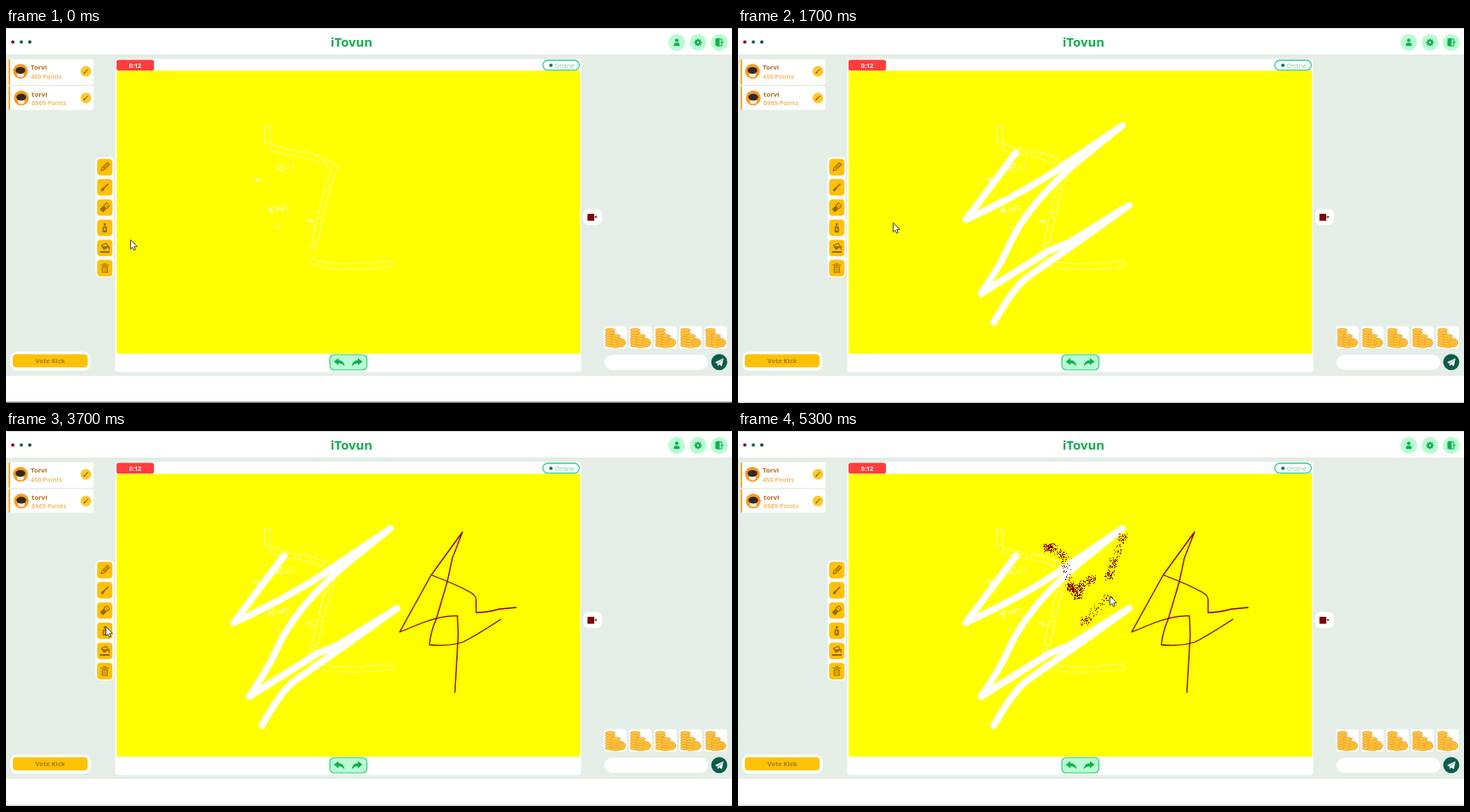
Write an HTML page with a canvas that moves like this. It is 854 by 442 pixels and loops after 5400 ms.

```html
<!DOCTYPE html>
<html lang="en">
<head>
<meta charset="utf-8">
<title>Drawing room</title>
<style>
html, body { margin: 0; width: 100%; height: 100%; overflow: hidden; background: #fff; }
canvas { display: block; width: 854px; height: 442px; }
svg { position: absolute; }
</style>
</head>
<body>
<canvas id="stage" width="854" height="442"></canvas>
<svg width="0" height="0"><path id="probe"/></svg>
<script>
const ctx = document.getElementById('stage').getContext('2d');
const probe = document.getElementById('probe');
const LOOP = 5400, STEP = 100;
const FONT = '"Open Sans", "Noto Sans", sans-serif';
const YELLOW = '#ffff00', MAROON = '#800000', BROWN = '#966a0e', GREEN = '#10b04f';
const AMBER = '#ffc107', GHOST = '#ffffa6';

const clamp = v => Math.max(0, Math.min(1, v));
const ease = k => k * k * (3 - 2 * k);
const mix = (a, b, k) => a.map((v, i) => v + (b[i] - v) * k);
function seeded(s) {
  return () => (s = (s * 16807) % 2147483647) / 2147483647;
}

// Gestures: each has a time span and a position within it
function rest(from, to, x, y) {
  return { from, to, pos: () => [x, y], draw() {} };
}
function stroke(from, to, d, color, width, lag) {
  const path = probe.cloneNode();
  path.setAttribute('d', d);
  const length = path.getTotalLength(), shape = new Path2D(d);
  const done = t => clamp((t - from) / (to - from));
  return {
    from, to,
    pos(t) {
      const p = path.getPointAtLength(length * done(t));
      return [p.x, p.y];
    },
    draw(t) {
      const k = done(t - lag);
      if (k > 0) inkPath(shape, color, width, 'round', [length * k, length * 2]);
    }
  };
}
// The can slows down at one key point per step, so dots pile up there
function spray(from, keys) {
  const to = from + (keys.length - 1) * STEP;
  function pos(t) {
    const s = clamp((t - from) / (to - from)) * (keys.length - 1);
    const i = Math.min(Math.floor(s), keys.length - 2);
    return mix(keys[i], keys[i + 1], ease(s - i));
  }
  function draw(t) {
    const rnd = seeded(from);
    ctx.fillStyle = MAROON;
    for (let time = from - 30; time < Math.min(t, to + 30); time += 1.5) {
      const [x, y] = pos(time);
      ctx.fillRect(Math.round(x - 5 + rnd() * 9), Math.round(y - 5 + rnd() * 9), 1, 1);
    }
  }
  return { from, to, pos, draw };
}

const zigzag = 'M327 147L268 226Q345 190 390 157L452 115L400 157Q340 208 318 258Q310 277 286 313' +
  'L365 263L391 252L460 209L400 252L340 294Q324 306 301 347';
const hook = 'M501 170Q530 181 546 190Q553 194 553 199V214Q565 214 580 210L600 208';
const bolt = 'M582 222Q553 241 537 249Q520 254 498 252Q500 235 506 222L519 178L525 150L537 119' +
  'L500 170L463 237L490 226Q515 217 531 218L532 240L528 308';

const gestures = [
  rest(0, 100, 146, 250),
  rest(300, 640, 119, 209),
  stroke(827, 1555, zigzag, '#fff', 8, 15),
  rest(1800, 1880, 114, 163),
  stroke(1990, 2200, hook, MAROON, 1.3, 100),
  stroke(2240, 2860, bolt, MAROON, 1.3, 100),
  rest(3100, 3100, 257, 207),
  rest(3200, 3860, 117, 231),
  spray(4100, [[364, 138], [368, 137], [383, 147], [391, 185], [392, 184], [400, 195], [402, 184], [417, 175]]),
  spray(4900, [[453, 125], [442, 156], [436, 172]]),
  spray(5200, [[408, 224], [437, 195]])
];
function pointerAt(t) {
  const i = gestures.findIndex(g => t <= g.to);
  if (i < 0) return gestures[gestures.length - 1].pos(t);
  const next = gestures[i];
  if (t >= next.from) return next.pos(t);
  const last = gestures[i - 1];
  return mix(last.pos(last.to), next.pos(next.from), ease((t - last.to) / (next.from - last.to)));
}

// Drawing helpers
function paint(shape, fill, outline, lw = 1) {
  if (fill) { ctx.fillStyle = fill; ctx.fill(shape); }
  if (outline) inkPath(shape, outline, lw);
}
function inkPath(shape, color, width, cap = 'round', dash = [], offset = 0) {
  ctx.strokeStyle = color;
  ctx.lineWidth = width;
  ctx.lineCap = cap;
  ctx.lineJoin = 'round';
  ctx.setLineDash(dash);
  ctx.lineDashOffset = offset;
  ctx.stroke(shape);
  ctx.setLineDash([]);
}
function box(x, y, w, h, r, fill, outline, lw) {
  const shape = new Path2D();
  shape.roundRect(x, y, w, h, r);
  paint(shape, fill, outline, lw);
}
function oval(x, y, rx, ry, fill, outline, lw) {
  const shape = new Path2D();
  shape.ellipse(x, y, rx, ry, 0, 0, Math.PI * 2);
  paint(shape, fill, outline, lw);
}
const dot = (x, y, r, fill) => oval(x, y, r, r, fill);
const fillPath = (d, color) => paint(new Path2D(d), color);
const drawPath = (d, color, width) => inkPath(new Path2D(d), color, width);
function text(str, x, y, size, color, weight = 700, align = 'left') {
  ctx.font = `${weight} ${size}px ${FONT}`;
  ctx.textAlign = align;
  ctx.fillStyle = color;
  ctx.fillText(str, x, y);
}
function place(x, y, angle, draw, sx = 1, sy = sx) {
  ctx.save();
  ctx.translate(x, y);
  ctx.scale(sx, sy);
  ctx.rotate(angle);
  draw();
  ctx.restore();
}

function drawHeader() {
  box(0, 0, 854, 32, 0, '#fff');
  box(0, 0, 854, 1, 0, '#e3e5e4');
  box(0, 31.5, 854, 1, 0, '#dbe5dd');
  ['#8a1016', '#17603a', '#0c4d42'].forEach((c, i) => dot(8 + i * 10, 16.5, 1.9, c));
  text('iTovun', 406.5, 22, 15, GREEN, 700, 'center');
  for (let i = 0; i < 3; i++) dot(789 + i * 25, 17, 10, '#bafbd3');
  dot(789, 14.5, 2.1, GREEN);
  box(785.5, 17.2, 7, 4, [3, 3, 1, 1], GREEN);
  for (let i = 0; i < 8; i++) {
    place(814, 17, i * Math.PI / 4, () => box(-0.9, -4.4, 1.8, 3, 0.4, GREEN));
  }
  oval(814, 17, 2.4, 2.4, null, GREEN, 1.9);
  fillPath('M834.5 12.5L839.5 11.8V22L834.5 21Z', GREEN);
  drawPath('M840 13H842V21H840M841 17H844', GREEN, 1.1);
}

function brush() {
  box(-0.8, -6, 1.6, 7.5, 0.6, BROWN);
  oval(0, 3.5, 1.6, 2.5, BROWN);
}
function pencil() {
  drawPath('M-1.7 -6H1.7V3L0 6L-1.7 3ZM-1.7 -3.7H1.7M0 -2V2', BROWN, 1);
}
function eraser() {
  box(-2.6, 0, 5.2, 5.5, 0.8, BROWN);
  box(-2.6, -5.5, 5.2, 5, 0.8, null, BROWN, 1);
  drawPath('M-2 -3H2', BROWN, 0.8);
}
function sprayCan() {
  box(-2.5, -1.5, 5, 7, 1, BROWN);
  box(-1.2, -5.5, 2.4, 3.4, 0.5, BROWN);
  box(-0.7, 0, 1.4, 3.5, 0, AMBER);
}
function bucket() {
  drawPath('M-4 -3L2 -5.4L4 -1L-1 1.5ZM5 -2V2', BROWN, 1.2);
  fillPath('M-3.5 -2H4L-1 2Z', BROWN);
  drawPath('M-5 4.8H5', BROWN, 1.8);
}
function bin() {
  drawPath('M-3 -1.5V5H3V-1.5ZM-4.3 -3.5H4.3M-1.5 -5.3H1.5', BROWN, 1.1);
  drawPath('M-1 0V3.3M1 0V3.3', BROWN, 0.7);
}
function drawTools() {
  box(105.5, 152, 21, 142, 5, '#fff');
  [pencil, brush, eraser, sprayCan, bucket, bin].forEach((icon, i) => {
    const y = 164 + i * 23.8;
    box(107.2, y - 9.7, 18, 19.4, 4, AMBER);
    place(116.2, y, i < 3 ? Math.PI / 4 : 0, icon);
  });
}

function drawPlayer(name, points, y, h, ax) {
  const cy = y + 14;
  box(3, y, 100, h, 2, '#fff');
  box(3, y, 2, h, 1, '#f4b13c');
  dot(ax, cy, 8.7, '#f99a20');
  box(ax - 4, cy + 1, 8, 6, 3, '#f5ede2');
  oval(ax, cy - 1, 5.8, 4, '#30281f');
  text(name, ax + 12, y + 12, 7.8, '#b8681b');
  text(points, ax + 12, y + 22.5, 7.4, '#f2ad49', 600);
  dot(94, cy, 6.3, '#ffc92d');
  place(94, cy, Math.PI / 4, brush, 0.62);
}

function drawCoins(x) {
  box(x, 351.5, 26.5, 26.5, 3, '#fff');
  const coin = (cx, cy, r) => oval(cx, cy, r, 1.9, '#ffc740', '#eb9c25', 0.8);
  for (let i = 0; i < 7; i++) coin(x + 7.2, 374 - i * 3, 5.8);
  for (let i = 0; i < 5; i++) coin(x + 13.5, 375 - i * 3, 5.6);
  oval(x + 20.3, 371, 4.9, 4.9, '#ffc43a', '#eb9c25', 0.9);
  oval(x + 20.3, 371, 2.5, 2.5, null, '#f3a72c', 0.8);
}

function undoArrow() {
  fillPath('M-6.3 -0.7L-1 -5V-2.6Q5.5 -2.4 6.2 4.6Q3.6 1.2 -1 1.2V3.6Z', GREEN);
}

function drawPanels(t) {
  box(0, 0, 854, 442, 0, '#e4eee6');
  drawHeader();
  box(0, 410, 854, 32, 0, '#fff');
  box(0, 440.5, 854, 1.5, 0, t < 1500 ? '#737876' : '#d5d8d6');
  drawPlayer('Torvi', '450 Points', 37, 30, 17);
  drawPlayer('torvi', '6969 Points', 68.5, 28, 18);

  box(5, 381.5, 94.5, 22.5, 8, '#fff');
  box(8, 384.5, 88, 15.5, 4, AMBER);
  text('Vote Kick', 52, 395, 7.5, '#a97b12', 700, 'center');

  box(128.5, 36.5, 548, 369, 3, '#fff');
  box(130.3, 50.4, 545, 333.3, 0, YELLOW);
  box(130, 37.5, 44, 12.7, 2.5, '#ff3d3d');
  text('0:12', 152, 46.5, 7.2, '#fff', 700, 'center');
  box(631.5, 38, 43, 11.7, 6, '#fff', '#35cf90', 1.3);
  dot(641, 44, 2, '#0b7a55');
  text('Online', 645.5, 46.6, 7.5, '#7cc7a4', 400);

  box(381, 385, 43.5, 18, 5, '#b9fbd2', '#2ccf78', 1.2);
  place(392, 394, 0, undoArrow);
  place(413, 394, 0, undoArrow, -1, 1);
  drawTools();

  box(679, 213.5, 22, 18.8, 6, '#fff');
  box(684, 219, 8, 8.3, 0.5, MAROON);
  fillPath('M692.2 222H695.6L693.9 224.3Z', '#222');
  for (let i = 0; i < 5; i++) drawCoins(703.5 + i * 29.5);
  box(704, 385, 122, 18, 9, '#fff');
  dot(839, 393.8, 9.5, '#0b5c4b');
  fillPath('M834 394L844 389.3L842 398.5L838.7 396.4L837.3 398.7L836.8 395.4Z', '#fff');
  drawPath('M837.2 395.6L842.3 391.2', '#0b5c4b', 0.6);
}

// Hollow dashes and specks left over from an earlier drawing
function hollow(d, dash, gap) {
  const shape = new Path2D(d);
  inkPath(shape, GHOST, 7.6, 'butt', [dash, gap]);
  inkPath(shape, YELLOW, 5.6, 'butt', [dash - 2, gap + 2], -1);
}
function drawRemnants() {
  hollow('M307.5 115V136', 21, 9);
  hollow('M311 140Q325 146 343 148Q372 152 386 165Q380 185 374 205L361 262', 31, 4);
  hollow('M359 274Q372 281 403 281Q430 281 455 277.5', 97, 9);
  const rnd = seeded(77);
  const clusters = [[327, 163, 10], [293, 178, 4], [319, 213, 13], [319, 234, 2], [357, 227, 4]];
  for (const [x, y, reach] of clusters) {
    for (let i = 0; i < reach * 2; i++) {
      const px = x + (rnd() * 2 - 1) * reach, py = y + (rnd() * 2 - 1) * reach * 0.45;
      box(px, py, 0.8 + rnd() * 2.4, 0.8 + rnd() * 1.3, 0, '#ffffc0');
    }
  }
  for (let i = 0; i < 3; i++) dot(236 + i * 20, 231, 0.7, GHOST);
}

function drawPointer(t) {
  const [x, y] = pointerAt(t);
  const arrow = new Path2D('M0 0V10.5L2.4 8.4L4 12L5.8 11.2L4.2 7.8L7.4 7.6Z');
  place(x + 0.5, y, 0, () => paint(arrow, '#fff', '#34343a', 0.9));
}

function render(t) {
  drawPanels(t);
  drawRemnants();
  gestures.forEach(g => g.draw(t));
  drawPointer(t);
}

function tick() {
  const t = performance.now() % LOOP;
  render(Math.floor(t / STEP) * STEP);
  requestAnimationFrame(tick);
}
tick();
</script>
</body>
</html>
```
